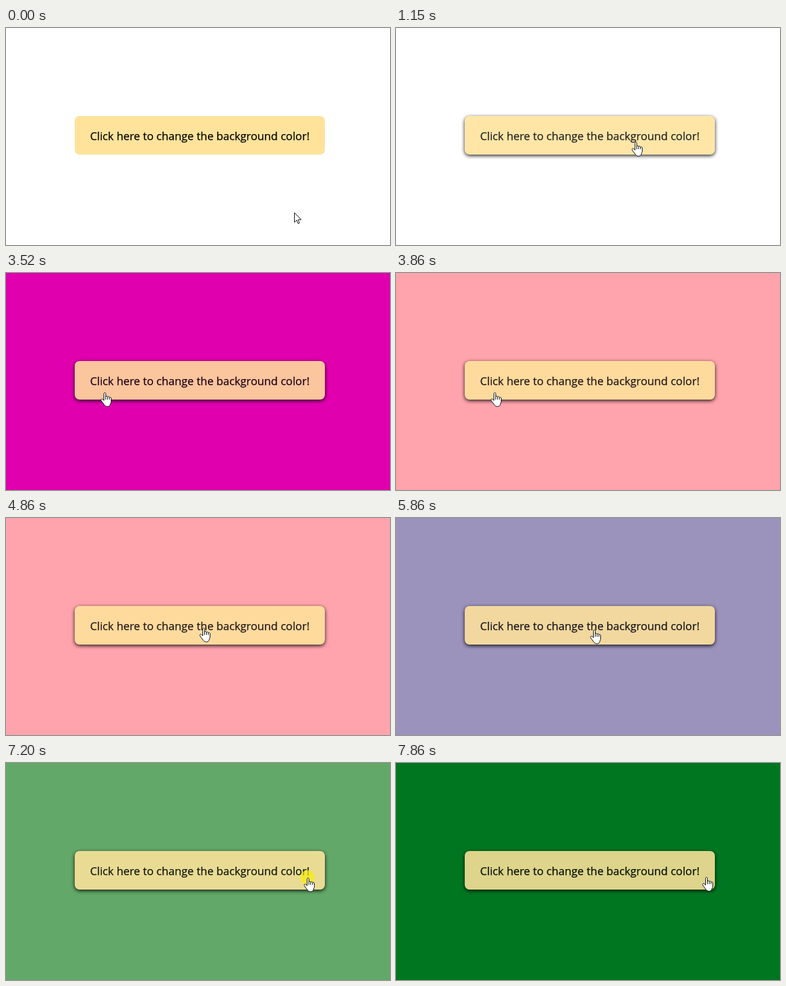
These frames come from a looping animation (637 by 360 pixels, 8 s). An HTML page with a canvas:

```html
<!DOCTYPE html>
<html lang="en">
<head>
<meta charset="utf-8">
<title>Background color button</title>
<style>
  html, body { margin: 0; width: 100%; height: 100%; overflow: hidden; background: #fff; }
  #stage { position: relative; width: 637px; height: 360px; overflow: hidden; }
  #button {
    position: absolute; left: 114px; top: 146px; width: 415px; height: 64px;
    border-radius: 8px; background: #ffe39b; color: #000;
    font: 18.38px/66px "Open Sans", "Noto Sans", sans-serif;
    text-align: center; white-space: nowrap;
    -webkit-text-stroke: 0.25px #000;
  }
  #button.hover { opacity: .87; box-shadow: 0 2px 6px #000; }
  canvas { position: absolute; left: 0; top: 0; }
</style>
</head>
<body>
<div id="stage">
  <div id="button">Click here to change the background color!</div>
  <canvas id="pointer" width="637" height="360"></canvas>
</div>
<script>
const LOOP = 8000;
const stage = document.getElementById('stage');
const button = document.getElementById('button');
const ctx = document.getElementById('pointer').getContext('2d');

const arrow = new Path2D('M.5 .5V16.3L4.2 12.9L6.6 18.5L8.9 17.5L6.5 12H11.6Z');
const hand = new Path2D('M5.5 13.5V2.2C5.5 0 8.5 0 8.5 2.2V7.2C9 5.9 11.5 6.1 11.5 7.8' +
  'C12 6.7 14.5 6.9 14.5 8.6C15 7.7 17.5 8 17.5 10V15C17.5 17.3 16.2 18.6 15.8 20.3' +
  'C15.3 22.6 13.5 23.5 11.5 23.5C8.3 23.5 6.8 22 5.6 20L1 13.9C-.5 11.5 2.3 10 3.8 11.6Z');
const knuckles = new Path2D('M8.5 7V12M11.5 8V12M14.5 9V12');

// Pointer samples: start time, hotspot x, hotspot y, whether the mouse is pressed
const moves = [
  [0, 478, 306], [330, 402, 278], [490, 387, 262],
  [820, 397, 172], [1150, 397, 189], [1490, 420, 245],
  [1820, 442, 187], [2150, 523, 187], [2480, 517, 187],
  [3200, 212, 257], [3520, 163, 198],
  [4200, 311, 238], [4530, 323, 253], [4860, 327, 182],
  [5520, 330, 103, true], [5860, 328, 185],
  [6540, 460, 230], [6870, 500, 190], [7200, 500, 190, true],
  [7530, 508, 190], [7860, 514, 189]
];

const colors = [
  [0, '#ffffff'], [2810, '#e000ae'], [3860, '#ffa3ac'], [5190, '#9c93bc'],
  [6210, '#62a868'], [7530, '#2a8a40'], [7860, '#007621']
];

const current = (list, t) => list.filter(step => step[0] <= t).pop();

const isOver = (x, y) => x >= 114 && x < 529 && y >= 146 && y < 210;

function outline(path) {
  ctx.fillStyle = '#fff';
  ctx.fill(path);
  ctx.strokeStyle = '#000';
  ctx.lineWidth = 1;
  ctx.stroke(path);
}

function drawPointer(x, y, pressed, over) {
  ctx.clearRect(0, 0, 637, 360);
  if (pressed) {
    ctx.fillStyle = 'rgba(248, 240, 0, .65)';
    ctx.beginPath();
    ctx.arc(x, y, 12, 0, Math.PI * 2);
    ctx.fill();
  }
  ctx.save();
  ctx.translate(over ? x - 6 : x, y);
  outline(over ? hand : arrow);
  if (over) ctx.stroke(knuckles);
  ctx.restore();
}

function frame(now) {
  const t = now % LOOP;
  const [, x, y, pressed] = current(moves, t);
  const over = isOver(x, y);
  const color = current(colors, t)[1];
  stage.style.background = color;
  document.body.style.background = color;
  button.className = over ? 'hover' : '';
  drawPointer(x, y, pressed, over);
}

const start = performance.now();
function tick() {
  frame(performance.now() - start);
  requestAnimationFrame(tick);
}
tick();
</script>
</body>
</html>
```
